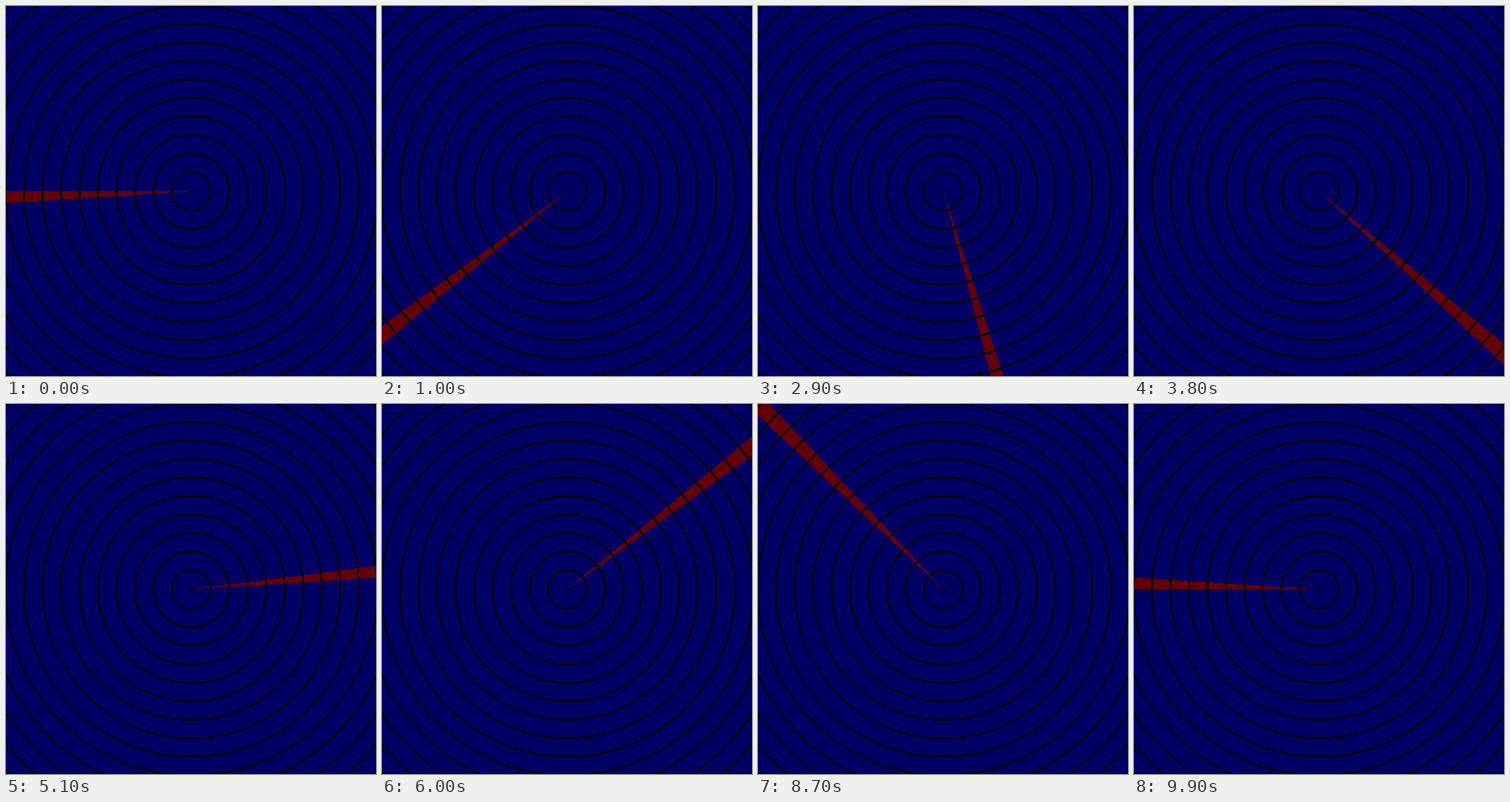
Write an HTML page with a canvas that moves like this. It is 500 px wide and 500 px high and loops after 10 s.

```html
<!DOCTYPE html>
<html lang="en">
<head>
<meta charset="utf-8">
<title>Radar sweep</title>
<style>
  html, body { margin: 0; width: 100%; height: 100%; overflow: hidden; background: #000064; }
  canvas { display: block; width: 500px; height: 500px; image-rendering: pixelated; }
</style>
</head>
<body>
<canvas id="stage" width="500" height="500"></canvas>
<script>
  const SIZE = 500, MID = 250;
  const STEPS = 100, STEP_MS = 100;
  const RING_GAP = 25, RING_WIDTH = 2.5;

  const ctx = document.getElementById('stage').getContext('2d');
  const image = ctx.createImageData(SIZE, SIZE);
  const sectors = Array.from({ length: STEPS }, () => []);

  function paint(offset, red, blue) {
    image.data[offset] = red;
    image.data[offset + 2] = blue;
  }

  // Hard-edged rings; every other pixel belongs to one sector,
  // counted from the left and turning through the bottom.
  for (let y = 0; y < SIZE; y++) {
    for (let x = 0; x < SIZE; x++) {
      const dx = x - MID, dy = y - MID;
      const offset = (y * SIZE + x) * 4;
      image.data[offset + 3] = 255;
      if (Math.hypot(dx, dy) % RING_GAP < RING_WIDTH) continue;
      const turn = Math.atan2(dy, -dx) / (2 * Math.PI);
      sectors[Math.floor((turn + 1) % 1 * STEPS + 1e-9) % STEPS].push(offset);
      paint(offset, 0, 100);
    }
  }

  let shown = -1;

  function draw(now) {
    const step = Math.floor(now / STEP_MS) % STEPS;
    if (step !== shown) {
      if (shown >= 0) sectors[shown].forEach(o => paint(o, 0, 100));
      sectors[step].forEach(o => paint(o, 100, 0));
      ctx.putImageData(image, 0, 0);
      shown = step;
    }
  }

  const start = performance.now();
  function tick() {
    draw(performance.now() - start);
    requestAnimationFrame(tick);
  }
  tick();
</script>
</body>
</html>
```
